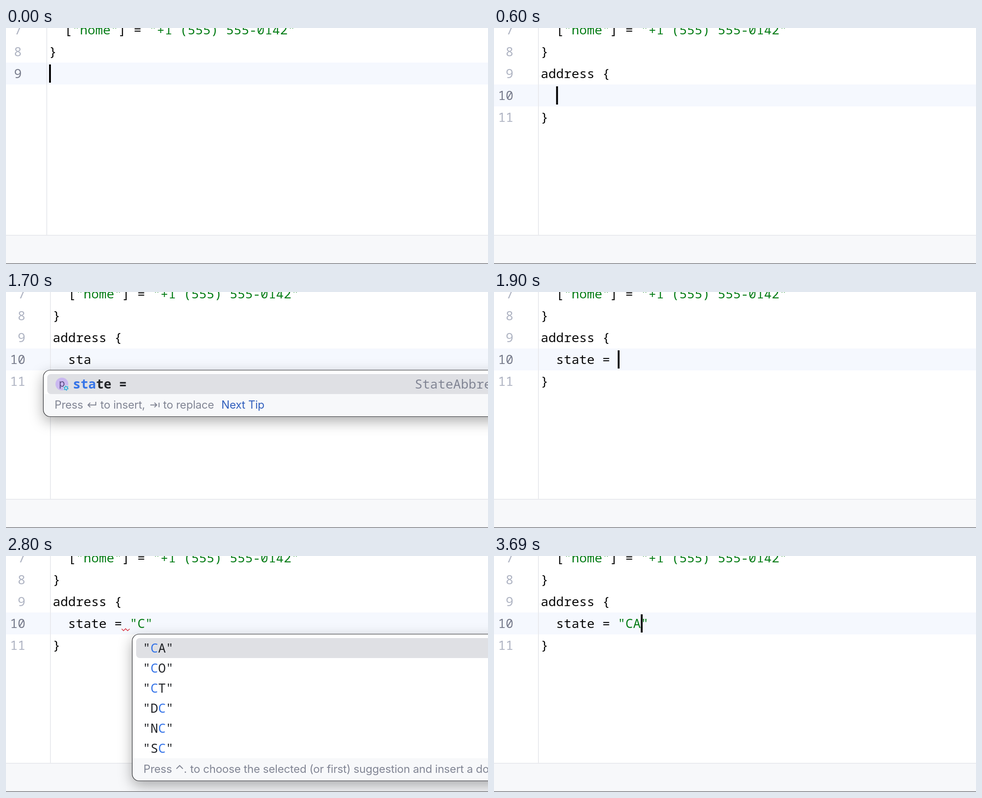
These frames come from a looping animation (1052 px wide and 518 px high, 3890 ms). An HTML page:

```html
<!DOCTYPE html>
<html lang="en">
<head>
<meta charset="utf-8">
<title>Editor completion</title>
<style>
  html, body { margin: 0; width: 100%; height: 100%; overflow: hidden; background: #fff; }
  svg { display: block; width: 100vw; height: 100vh; }
  text { white-space: pre; }
  .code { font: 28px "Noto Sans Mono", monospace; fill: #080808; }
  .bold { font-weight: 700; }
  .ui { font: 24px Inter, sans-serif; letter-spacing: -.2px; fill: #818594; }
  .box { filter: drop-shadow(0 10px 15px rgba(0, 0, 0, .33)); }
  .line { fill: none; stroke: #818594; stroke-width: 2; }
</style>
</head>
<body>
<svg id="stage" viewBox="0 0 1052 518"></svg>
<script>
(() => {
  const LOOP = 3890, BLINK = 390, CHAR = 16.8, ROW = 48, ITEM = 44, NESTED = 500;
  const stage = document.getElementById('stage');

  const first = { left: 40, row: 9, icons: 2, tip: 'insert' };
  const props = { left: 81, row: 10, tip: 'insert' };
  const values = { left: 275, row: 10, plain: true };
  const quoted = codes => codes.split(' ').map(c => `"${c}"`);

  const popups = {
    a: { ...first, match: 'a', items: ['address {', 'address =', 'abstract', 'local'] },
    ad: { ...first, match: 'ad', items: ['address {', 'address ='] },
    st: { ...props, match: 'st', icons: 2, items: ['street =', 'state =', 'const'] },
    sta: { ...props, match: 'sta', icons: 1, items: ['state ='] },
    all: { ...values, match: '', items: quoted('AK AL AR AS AZ CA CO CT DE') },
    c: { ...values, match: 'C', tip: 'dot', items: quoted('CA CO CT DC NC SC') }
  };

  // Each step: start time, text of the edited line, caret column, popup, error mark.
  const steps = [
    [0, '', 0],
    [100, 'a', 1],
    [200, 'a', 1, 'a'],
    [300, 'ad', 2, 'a'],
    [400, 'ad', 2, 'ad'],
    [NESTED, '  ', 2],
    [800, '  s', 3],
    [1000, '  st', 4],
    [1100, '  st', 4, 'st'],
    [1300, '  sta', 5, 'st'],
    [1400, '  sta', 5, 'sta'],
    [1800, '  state = ', 10],
    [2000, '  state = ""', 11, '', true],
    [2100, '  state = ""', 11, 'all', true],
    [2400, '  state = "C"', 12, 'all', true],
    [2500, '  state = "C"', 12, 'c', true],
    [2900, '  state = "CA"', 13, '', true],
    [3200, '  state = "CA"', 13]
  ];

  const rect = (x, y, w, h, fill, more = '') =>
    `<rect x="${x}" y="${y}" width="${w}" height="${h}" fill="${fill}" ${more}/>`;
  const text = (x, y, body, cls = 'code', more = '') =>
    `<text x="${x}" y="${y}" class="${cls}" ${more}>${body}</text>`;
  const label = (x, y, body, more) => text(x, y, body, 'ui', more);
  const span = (body, fill) => `<tspan fill="${fill}">${body}</tspan>`;
  const path = (d, more = '') => `<path class="line" d="${d}" ${more}/>`;
  const paint = line => line.replace(/"[^"]*"/g, s => span(s, '#067d17'));
  const rowTop = row => 76 + (row - 9) * ROW;

  function mark(item, match) {
    const at = match ? item.indexOf(match) : -1;
    if (at < 0) return item;
    return item.slice(0, at) + span(match, '#3574e8') + item.slice(at + match.length);
  }

  function icon(x, y, back) {
    const ring = (r, more) => `<circle cx="${x + 9}" cy="${y + 9}" r="${r}" ${more}/>`;
    return `<circle cx="${x}" cy="${y}" r="14" fill="#cab8f0"/>` +
      label(x, y + 6, 'p', 'text-anchor="middle" style="font-size:21px;fill:#54467c"') +
      ring(6.5, `fill="${back}"`) +
      ring(3.2, 'fill="none" stroke="#3fb0dc" stroke-width="2"') +
      ring(4.8, 'fill="none" stroke="#3fb0dc" stroke-width="1.6" stroke-dasharray="2.5 2.53"');
  }

  function tip(kind, x, y) {
    const base = y + 32;
    const press = label(x, base, 'Press');
    if (kind === 'dot') {
      return press + path(`M${x + 72} ${y + 23}l7 -7l7 7`) + label(x + 88, base, '.') +
        label(x + 102, base, 'to choose the selected (or first) suggestion and insert a dot afterwards');
    }
    return press +
      path(`M${x + 90} ${y + 17}v7h-17m5 -5l-5 5l5 5`) +
      label(x + 100, base, 'to insert,') +
      path(`M${x + 209} ${y + 24}h14m-5 -5l5 5l-5 5m10 -10v10`) +
      label(x + 237, base, 'to replace') +
      label(x + 364, base, 'Next Tip', 'style="fill:#315fbd"');
  }

  function popup(p) {
    const { left, items } = p;
    const y = rowTop(p.row) + ROW - 1, list = y + 9, end = list + items.length * ITEM;
    const height = end - y + (p.tip ? 49 : 9);
    const frame = (fill, more) => rect(left + .5, y + .5, 1100, height, fill, `rx="15" ${more}`);
    let out = `<clipPath id="frame">${frame('#000', '')}</clipPath>`;
    out += frame('#fff', 'class="box"');
    out += rect(left + 9, list, 1100, ITEM, '#dfe0e4', 'rx="8"');
    items.forEach((item, i) => {
      const mid = list + i * ITEM + ITEM / 2;
      const x = left + (p.plain ? 23.4 : 65);
      if (i < p.icons) out += icon(left + 41, mid, i ? '#fff' : '#dfe0e4');
      out += text(x, mid + 10, mark(item, p.match), p.plain ? 'code' : 'code bold', 'style="fill:#222428"');
      if (item === 'state =') out += text(892, mid + 10, 'StateAbbreviation', 'code', 'style="fill:#818594"');
    });
    if (p.tip) {
      out += `<g clip-path="url(#frame)">${rect(left, end, 1100, 50, '#f7f8fa')}</g>`;
      out += tip(p.tip, left + 25, end);
    }
    return out + frame('none', 'stroke="#2d2e32" stroke-width="1.2"');
  }

  function caretOn(t, edited) {
    const typed = steps.find(s => s[1] === edited)[0];
    return Math.floor((t - typed) / BLINK) % 2 === 0;
  }

  function draw(t) {
    const [, edited, col, list, error] = steps.filter(s => s[0] <= t).pop();
    const nested = t >= NESTED;
    const shift = nested ? 8 : 0, codeX = 94 + shift, row = nested ? 10 : 9;
    const lines = ['  ["home"] = "+1 (555) 555-0142"', '}']
      .concat(nested ? ['address {', edited, '}'] : [edited]);

    let out = rect(0, 0, 1052, 518, '#fff') + rect(0, rowTop(row), 1052, ROW, '#f5f8fe');
    out += rect(88 + shift, 0, 2, 454, '#e9eaee');
    out += rect(0, 454, 1052, 64, '#f7f8fa') + rect(0, 454, 1052, 2, '#e9eaee');
    lines.forEach((line, i) => {
      const n = i + 7, y = rowTop(n) + 34;
      const fill = n === row ? '#767a8a' : '#aeb3c2';
      out += text(34.4 + shift, y, n, 'code', `text-anchor="end" style="fill:${fill}"`);
      out += text(codeX, y, paint(line));
    });
    if (error) out += path('M252.5 160l4 4l4.5 -4.5l4.5 4.5l4.5 -4', 'style="stroke:#d92b3a;stroke-width:1.5"');
    if (caretOn(t, edited)) out += rect(codeX + col * CHAR, rowTop(row) + 4, 4, 40, '#000');
    if (list) out += popup(popups[list]);
    return out + rect(0, 516.5, 1052, 1.5, '#77787c');
  }

  let shown = '';
  function tick() {
    const next = draw(performance.now() % LOOP);
    if (next !== shown) stage.innerHTML = shown = next;
    requestAnimationFrame(tick);
  }
  tick();
})();
</script>
</body>
</html>
```
